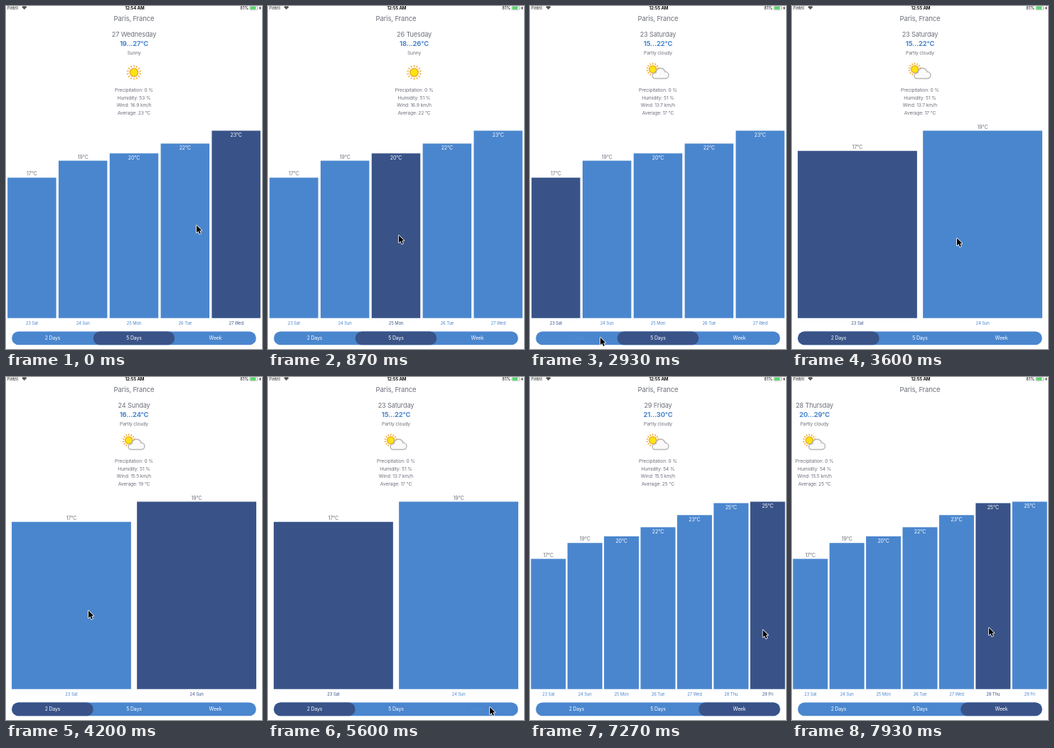
Write an HTML page with a canvas that moves like this. It is 360 by 480 pixels and loops after 8000 ms.

```html
<!DOCTYPE html>
<html lang="en">
<head>
<meta charset="utf-8">
<title>Weather</title>
<style>
html, body { margin: 0; width: 100%; height: 100%; overflow: hidden; background: #fff; }
canvas { display: block; width: 360px; height: 480px; }
</style>
</head>
<body>
<canvas></canvas>
<script>
const LOOP = 8000, W = 360, H = 480, MID = W / 2, BASE = 436.8, TOP = 262.4;
const BLUE = '#4a86ce', NAVY = '#395388', GRAY = '#6e717c', WHITE = '#fff', INK = '#111';
const canvas = document.querySelector('canvas');
const c = canvas.getContext('2d');
const dpr = window.devicePixelRatio || 1;
canvas.width = W * dpr;
canvas.height = H * dpr;

const names = ['Saturday', 'Sunday', 'Monday', 'Tuesday', 'Wednesday', 'Thursday', 'Friday'];
const temps = [17.3, 19.4, 20.3, 21.5, 23.1, 24.7, 24.9];
const days = names.map((name, i) => {
  const sunny = i > 1 && i < 5;
  return {
    name, sunny, date: 23 + i, temp: temps[i], average: Math.round(temps[i]),
    range: `${15 + i}...${Math.round(22.4 + 1.27 * i)}°C`,
    humidity: 51 + Math.min(3, 2 * Math.max(0, i - 3)),
    wind: sunny ? 16.9 : i ? 15.5 : 13.7
  };
});

const tabs = [['2 Days', 2], ['5 Days', 5], ['Week', 7]];
// [time, day] and [time, tab]
const picks = [[-999, 4], [70, 3], [870, 2], [1800, 0], [3870, 1], [4600, 0], [6870, 6], [7800, 5]];
const taps = [[-999, 1], [2930, 0], [5600, 2]];
// [arrival time, x, y] of the pointer's tip
const stops = [
  [0, 268, 307], [600, 184, 321], [1470, 42, 324], [2600, 99, 464], [3600, 232, 325],
  [4200, 116, 327], [5130, 312, 462], [6400, 307, 337], [6600, 328, 354], [7600, 277, 351]
];

const clamp = x => Math.max(0, Math.min(1, x));
const ease = x => (1 - Math.cos(Math.PI * clamp(x))) / 2;
const lerp = (a, b, p) => a + (b - a) * p;
const last = (list, t) => list.findLastIndex(k => k[0] <= t);

function text(s, x, y, size, color = GRAY, weight = 400, align = 'center') {
  c.font = `${weight} ${size}px Inter, sans-serif`;
  c.letterSpacing = `${-size * .018}px`;
  c.textAlign = align;
  c.textBaseline = 'middle';
  c.fillStyle = color;
  c.fillText(s, x, y);
}

function box(x, y, w, h, r, color) {
  c.fillStyle = color;
  c.beginPath();
  c.roundRect(x, y, w, h, r);
  c.fill();
}

function poly(points, fill, stroke) {
  c.beginPath();
  points.forEach(p => c.lineTo(...p));
  c.closePath();
  if (stroke) {
    c.strokeStyle = stroke;
    c.lineWidth = 1.6;
    c.stroke();
  }
  c.fillStyle = fill;
  c.fill();
}

function sun(x, y, r) {
  c.strokeStyle = '#efa322';
  c.lineWidth = 1.3;
  c.lineCap = 'round';
  c.beginPath();
  for (let i = 0; i < 14; i++) {
    const a = i * Math.PI / 7 - Math.PI / 2, dx = r * Math.cos(a), dy = r * Math.sin(a);
    c.moveTo(x + dx * 1.42, y + dy * 1.42);
    c.lineTo(x + dx * 1.72, y + dy * 1.72);
  }
  c.stroke();
  c.beginPath();
  c.arc(x, y, r, 0, 7);
  c.fillStyle = '#fbe414';
  c.fill();
  c.stroke();
}

function cloud(x, y) {
  const puffs = (grow, color) => {
    c.fillStyle = color;
    c.beginPath();
    for (const [dx, dy, r] of [[-6, 3.6, 4], [1.6, -.5, 6.6], [8.2, 2.8, 4.8]]) {
      c.moveTo(x + dx, y + dy);
      c.arc(x + dx, y + dy, r + grow, 0, 7);
    }
    c.rect(x - 6, y, 14.2, 7.6 + grow);
    c.fill();
  };
  puffs(.7, '#b8b8b8');
  puffs(-.8, '#fafafa');
}

function info(d, x) {
  text(`${d.date} ${d.name}`, x, 40, 9.2);
  text(d.range, x, 53.5, 9.4, BLUE, 700);
  text(d.sunny ? 'Sunny' : 'Partly cloudy', x, 65.5, 6.7);
  if (d.sunny) sun(x, 93, 5.7);
  else {
    sun(x - 7.3, 88.6, 5);
    cloud(x + 2, 94);
  }
  ['Precipitation: 0 %', `Humidity: ${d.humidity} %`, `Wind: ${d.wind} km/h`, `Average: ${d.average} °C`]
    .forEach((s, i) => text(s, x, 118.3 + i * 10.4, 6.7));
}

function status(t) {
  text('Fintril', 2, 3, 5.9, INK, 400, 'left');
  c.strokeStyle = INK;
  c.lineWidth = 1.3;
  c.lineCap = 'butt';
  for (const r of [.6, 2.4, 4.2]) {
    c.beginPath();
    c.arc(25.8, 5, r, -2.35, -.79);
    c.stroke();
  }
  text(t < 300 ? '12:54 AM' : '12:55 AM', 181, 3, 6.1, INK, 700);
  text('81%', 341, 3, 6, INK, 400, 'right');
  box(342.6, .2, 11.4, 5.4, 1.4, '#999');
  box(343.1, .7, 10.4, 4.4, 1, WHITE);
  box(343.5, 1.1, 7.9, 3.6, .8, '#4cd964');
  box(354.3, 2, .7, 1.8, .3, '#999');
  poly([[358, .2], [355.8, 3.3], [357.2, 3.3], [356.6, 5.8], [358.9, 2.5], [357.5, 2.5]], INK);
}

function bars(t, selected) {
  const [start, tab] = taps[last(taps, t - 70)], count = tabs[tab][1];
  const margin = 22 / count ** 1.45, gap = .047;
  const pitch = (W - 2 * margin) / (count - gap), width = pitch * (1 - gap);
  const scale = TOP / temps[count - 1] * ease((t - start) / 400);
  days.slice(0, count).forEach((d, i) => {
    const x = margin + i * pitch, y = BASE - d.temp * scale, mid = x + width / 2;
    const on = i === selected, inside = d.average >= 20;
    box(x, y, width, BASE - y, 0, on ? NAVY : BLUE);
    text(d.average + '°C', mid, y + (inside ? 6.7 : -5), 7, inside ? WHITE : GRAY);
    text(`${d.date} ${d.name.slice(0, 3)}`, mid, 444, 5.9, on ? NAVY : BLUE);
  });
}

function switcher(t) {
  const n = last(taps, t), [start, tab] = taps[n], age = t - start - 70;
  const from = taps[Math.max(0, n - 1)][1];
  const x = 8.2, y = 455.6, w = 114.5, h = 18.6;
  box(x, y, 3 * w, h, h / 2, BLUE);
  box(x + w * lerp(from, tab, ease(age / 300)), y, w, h, h / 2, NAVY);
  tabs.forEach(([label], i) => {
    c.globalAlpha = i === tab ? lerp(.08, 1, clamp(age / 150)) : 1;
    text(label, x + w * (i + .5), 465, 6.9, WHITE);
  });
  c.globalAlpha = 1;
}

function pointer(t) {
  const i = Math.min(last(stops, t), stops.length - 2);
  const [t0, x0, y0] = stops[i], [t1, x1, y1] = stops[i + 1];
  const start = Math.max(t0, t1 - 350), p = ease((t - start) / (t1 - start));
  c.save();
  c.translate(lerp(x0, x1, p), lerp(y0, y1, p));
  c.lineJoin = 'round';
  poly([[0, 0], [0, 10.2], [2.4, 8], [4.1, 12], [5.9, 11.2], [4.2, 7.4], [7.3, 7.2]], '#000', WHITE);
  c.restore();
}

function draw(t) {
  c.setTransform(dpr, 0, 0, dpr, 0, 0);
  c.fillStyle = WHITE;
  c.fillRect(0, 0, W, H);
  status(t);
  text('Paris, France', MID, 18.5, 9.6);

  // the old and the new day slide together, one stage width
  const n = last(picks, t), [start, day] = picks[n];
  const p = ease((t - start + 57) / 338);
  if (p < 1) {
    const old = picks[n - 1][1], shift = day < old ? W : -W;
    info(days[old], MID + shift * p);
    info(days[day], MID + shift * (p - 1));
  } else info(days[day], MID);

  bars(t, day);
  switcher(t);
  pointer(t);
}

const begin = performance.now();
function frame() {
  draw((performance.now() - begin) % LOOP);
  requestAnimationFrame(frame);
}
frame();
</script>
</body>
</html>
```
